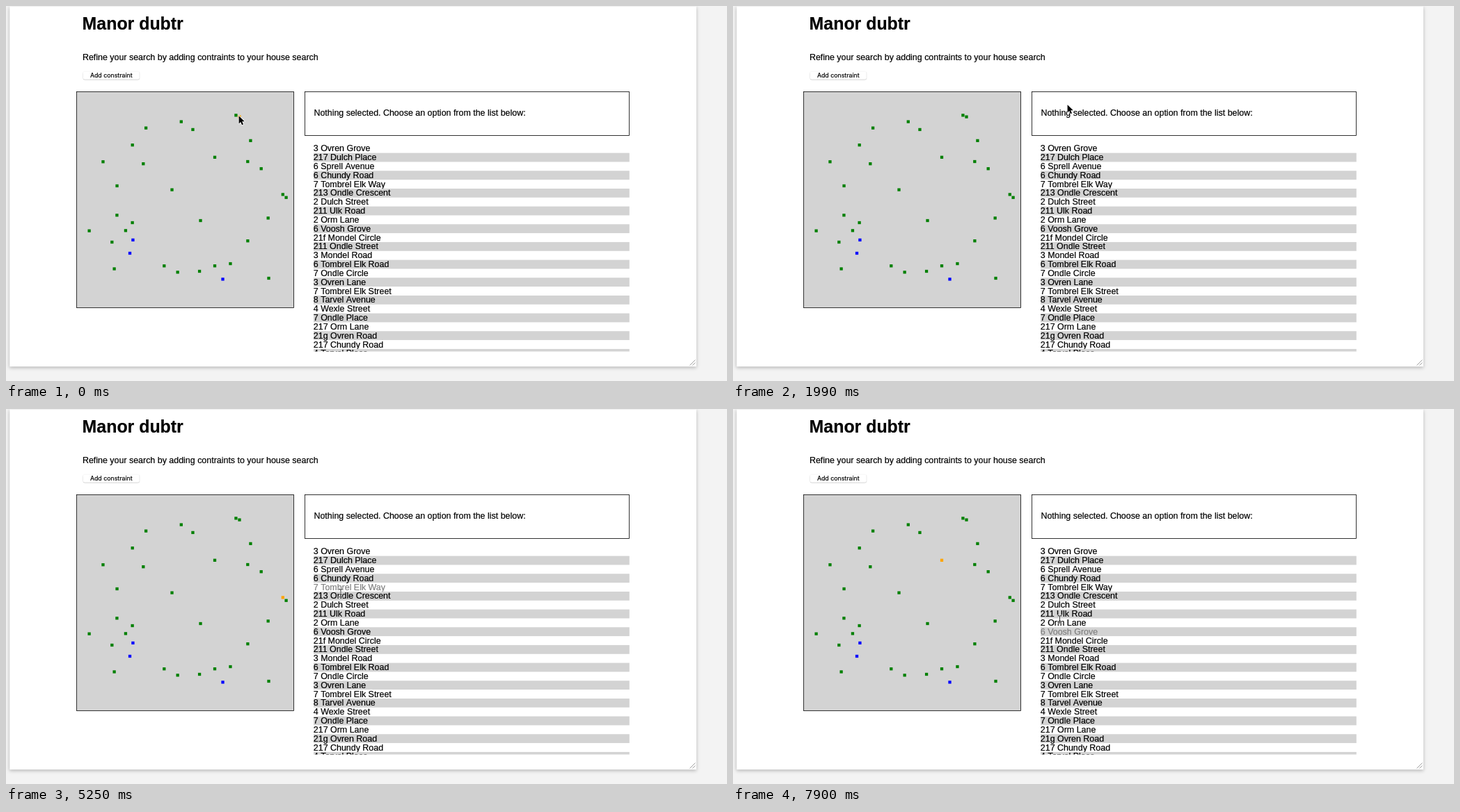
An HTML page with a canvas that plays this animation: 1036 px wide and 540 px high, repeating every 8 s.

```html
<!DOCTYPE html>
<html lang="en">
<head>
<meta charset="utf-8">
<title>House search</title>
<style>
  html, body { margin: 0; width: 100%; height: 100%; overflow: hidden; background: #f3f3f3; }
  canvas { display: block; }
</style>
</head>
<body>
<canvas id="stage" width="1036" height="540"></canvas>
<script>
const ctx = document.getElementById('stage').getContext('2d');
const LOOP = 8000;
const SANS = '"Liberation Sans", sans-serif';
const BODY = `12.44px ${SANS}`;
const BOLD = `bold 12.44px ${SANS}`;
const ROW_H = 12.83;
const LIST_TOP = 198.8;
const LAG = 140; // the hover highlight trails the pointer
const HOUSE = 4.3;

// Clicks on the map and on the clear button
const SELECT = 500, PRESS = 1840, CLEAR = 1990;

const addresses = [
  '3 Ovren Grove', '217 Dulch Place', '6 Sprell Avenue', '6 Chundy Road',
  '7 Tombrel Elk Way', '213 Ondle Crescent', '2 Dulch Street', '211 Ulk Road',
  '2 Orm Lane', '6 Voosh Grove', '21f Mondel Circle', '211 Ondle Street',
  '3 Mondel Road', '6 Tombrel Elk Road', '7 Ondle Circle', '3 Ovren Lane',
  '7 Tombrel Elk Street', '8 Tarvel Avenue', '4 Wexle Street', '7 Ondle Place',
  '217 Orm Lane', '21g Ovren Road', '217 Chundy Road', '4 Tarvel Place'
];
const PICKED = 18;

// Houses that light up, in list order; the picked one is kept apart.
const listed = [
  [377.5, 392], [347.3, 224], [181.6, 312], [279.5, 309], [397.8, 271.4], [152.3, 340],
  [238.5, 264.6], [197.3, 227.2], [300, 374.2], [300, 217.8], [119.6, 323.7]
];
const pickedHouse = [335.5, 159.6];
const landmarks = [[182.4, 336.9], [178, 356], [311.5, 393.4]];

// The other houses lie in a loose ring around the middle of the map.
const random = n => {
  const v = Math.sin(n * 12.9898) * 43758.5453;
  return v - Math.floor(v);
};
const others = Array.from({ length: 19 }, (_, i) => {
  const angle = -1.8 + (i + 0.6 * random(i + 1)) * Math.PI * 2 / 19;
  const radius = 95 + 58 * random(i + 50);
  return [257 + radius * Math.cos(angle), 279 + radius * Math.sin(angle)];
});

// Pointer moves, each shown in a number of equal time steps
const START = { x: 334, y: 158 };
const moves = [
  { from: 800, to: 1400, steps: 4, x: 480, y: 142, ease: 1 },
  { from: 2440, to: 2740, steps: 2, x: 478.7, y: 147, ease: 1 },
  { from: 2880, to: 3780, steps: 6, x: 478, y: 206, ease: 3 },
  { from: 3923, to: 5250, steps: 9, x: 481, y: 265, ease: 1 },
  { from: 5250, to: 6420, steps: 8, x: 479, y: 295, ease: 1 },
  { from: 6420, to: 7600, steps: 8, x: 476, y: 338, ease: 1 },
  { from: 7600, to: 7900, steps: 1, x: 469.5, y: 303, ease: 1 }
];

function stepTime(time) {
  const move = moves.findLast(m => m.from <= time);
  if (!move) return 0;
  const step = (move.to - move.from) / move.steps;
  const done = Math.floor((time - move.from) / step + 1e-6);
  return move.from + Math.min(done, move.steps + 1) * step;
}

function pointerAt(time) {
  let { x, y } = START;
  for (const m of moves) {
    if (time <= m.from) break;
    const k = 1 - (1 - Math.min(1, (time - m.from) / (m.to - m.from))) ** m.ease;
    x += (m.x - x) * k;
    y += (m.y - y) * k;
  }
  return { x, y };
}

function text(str, x, y, font = BODY, color = '#000', align = 'left') {
  ctx.font = font;
  ctx.fillStyle = ctx.strokeStyle = color;
  ctx.textAlign = align;
  ctx.lineWidth = 0.2;
  ctx.fillText(str, x, y);
  ctx.strokeText(str, x, y);
}

function rect(x, y, w, h, color) {
  ctx.fillStyle = color;
  ctx.fillRect(x, y, w, h);
}

function roundRect(x, y, w, h, r, color) {
  ctx.fillStyle = color;
  ctx.beginPath();
  ctx.roundRect(x, y, w, h, r);
  ctx.fill();
}

function outline(x, y, w, h) {
  ctx.strokeStyle = '#000';
  ctx.lineWidth = 0.8;
  ctx.strokeRect(x, y, w, h);
}

function polyline(points, closed) {
  ctx.beginPath();
  points.forEach(([x, y]) => ctx.lineTo(x, y));
  if (closed) ctx.closePath();
}

function withShadow(alpha, blur, offset, paint) {
  ctx.save();
  ctx.shadowColor = `rgba(0,0,0,${alpha})`;
  ctx.shadowBlur = blur;
  ctx.shadowOffsetY = offset;
  paint();
  ctx.restore();
}

function drawPanel() {
  rect(0, 0, 1036, 540, '#f3f3f3');
  withShadow(0.25, 5, 1.5, () => rect(5.3, 0.6, 986.7, 518.6, '#fff'));
  ctx.strokeStyle = '#8a8a8a';
  ctx.lineWidth = 0.8;
  for (const size of [8, 4]) {
    polyline([[990.5 - size, 517.5], [990.5, 517.5 - size]]);
    ctx.stroke();
  }
}

function drawButton(label, x, y, pressed) {
  let fill = '#fff';
  if (pressed) {
    fill = ctx.createLinearGradient(0, y, 0, y + 11.5);
    fill.addColorStop(0, '#3992fb');
    fill.addColorStop(1, '#0760ef');
  }
  withShadow(0.3, 1.2, 0.4, () => roundRect(x, y, 81, 11.5, 2.2, fill));
  text(label, x + 40.5, y + 8.9, '8.8px Inter, sans-serif', '#000', 'center');
}

function drawHouse([x, y], color = '#008000') {
  rect(x - HOUSE / 2, y - HOUSE / 2, HOUSE, HOUSE, color);
}

function drawMap(active, activeColor) {
  rect(102, 124, 311, 310, '#d3d3d3');
  others.forEach(house => drawHouse(house));
  listed.forEach((house, i) => drawHouse(house, i === active ? activeColor : undefined));
  drawHouse(pickedHouse, active === PICKED ? activeColor : undefined);
  landmarks.forEach(mark => drawHouse(mark, '#00f'));
  outline(101.5, 123.5, 312, 311);
}

function drawDetails(selected, pressed) {
  outline(429.5, 123.5, 466, selected ? 133.5 : 63);
  if (!selected) {
    text('Nothing selected. Choose an option from the list below:', 442.4, 158.4);
    return;
  }
  drawButton('Clear selection', 443.8, 137, pressed);
  text(addresses[PICKED], 442.4, 175.8, `bold 14.55px ${SANS}`);
  ['Number of bedrooms:', 'Number of bathrooms:'].forEach((label, i) => {
    const y = 203.7 + i * 25.3;
    text(label, 442.4, y, BOLD);
    const width = ctx.measureText(label).width;
    text(' 3', 442.4 + width, y);
  });
}

function drawList(selected, hovered) {
  const top = LIST_TOP + (selected ? 70.7 : 0);
  ctx.save();
  ctx.beginPath();
  ctx.rect(430, 190, 470, (selected ? 519 : 497.5) - 190);
  ctx.clip();
  addresses.forEach((address, i) => {
    const y = top + i * ROW_H;
    if (i % 2) rect(442, y, 453.8, ROW_H, '#d3d3d3');
    const color = selected && i === PICKED ? '#f00' : i === hovered ? '#808080' : '#000';
    text(address, 441.8, y + 10.5, BODY, color);
  });
  ctx.restore();
}

function drawArrow({ x, y }) {
  ctx.save();
  ctx.translate(x, y);
  polyline([[0.6, 0.3], [0.6, 11.4], [3.2, 9], [5, 13.3], [7, 12.5], [5.2, 8.3], [8.8, 8.2]], true);
  ctx.strokeStyle = '#fff';
  ctx.lineWidth = 1.6;
  ctx.lineJoin = 'round';
  ctx.stroke();
  ctx.fillStyle = '#000';
  ctx.fill();
  ctx.restore();
}

function drawBeam({ x, y }) {
  ctx.save();
  ctx.translate(x, y);
  ctx.lineCap = 'round';
  for (const [color, width] of [['rgba(255,255,255,0.7)', 2.2], ['#222', 0.9]]) {
    ctx.strokeStyle = color;
    ctx.lineWidth = width;
    for (const side of [-1, 1]) {
      polyline([[-2.6, side * 6], [0, side * 4.8], [2.6, side * 6]]);
      ctx.stroke();
    }
    polyline([[0, -4.8], [0, 4.8]]);
    ctx.stroke();
    polyline([[-1.4, 2.2], [1.4, 2.2]]);
    ctx.stroke();
  }
  ctx.restore();
}

function draw(time) {
  const selected = time >= SELECT && time < CLEAR;
  const pressed = selected && time >= PRESS;
  const shown = stepTime(time);
  const pointer = pointerAt(shown);
  const hovered = Math.floor((pointerAt(shown - LAG).y - LIST_TOP) / ROW_H);
  const active = time < CLEAR ? PICKED : hovered;

  drawPanel();
  text('Manor dubtr', 109.6, 34.3, `bold 24.9px ${SANS}`);
  text('Refine your search by adding contraints to your house search', 109.9, 77.9);
  drawButton('Add constraint', 110.8, 94.3, false);
  drawMap(active, selected ? '#f00' : '#ffa500');
  drawDetails(selected, pressed);
  drawList(selected, hovered);
  if (selected) roundRect(984.6, 2.2, 5.6, 455, 2.8, '#7d7d7d');
  if (hovered >= 0) drawBeam(pointer);
  else drawArrow(pointer);
}

let start;
function loop(now) {
  start ??= now;
  draw((now - start) % LOOP);
  requestAnimationFrame(loop);
}
draw(0);
requestAnimationFrame(loop);
</script>
</body>
</html>
```
